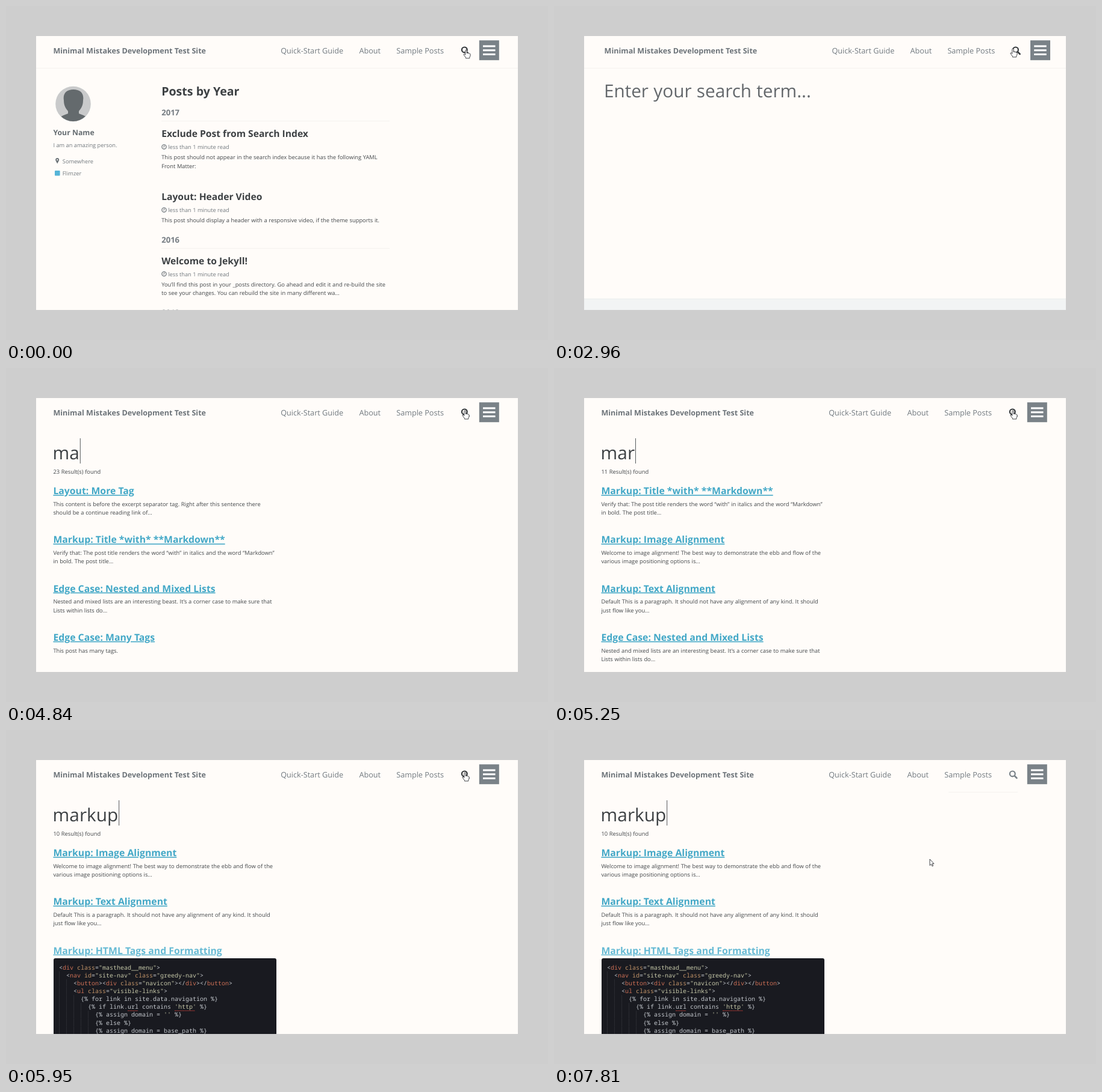
An HTML page that plays this animation: 900x556 px, repeating every 8000 ms.

```html
<!DOCTYPE html>
<html lang="en">
<head>
<meta charset="utf-8">
<title>Site search</title>
<style>
  html, body { margin: 0; width: 100%; height: 100%; overflow: hidden; background: #cecece; }
  svg { display: block; width: 900px; height: 556px; }
  text { font-family: "Open Sans", "Noto Sans", sans-serif; text-rendering: geometricPrecision; white-space: pre; }
  .brand, .year, .name, .h1, .h2, .link { font-weight: 700; }
  .brand { font-size: 12.55px; fill: #6d747a; }
  .nav { font-size: 12.65px; fill: #727a80; }
  .h1 { font-size: 19.6px; fill: #3d4144; }
  .h2 { font-size: 15.65px; fill: #3d4144; }
  .year { font-size: 13.1px; fill: #757c82; }
  .name { font-size: 12.3px; fill: #666d72; }
  .meta { font-size: 9.28px; fill: #737a7f; }
  .body { font-size: 9.32px; fill: #44484b; word-spacing: .03em; }
  .link { font-size: 15.8px; fill: #43a8c7; text-decoration: underline; text-decoration-skip-ink: none; }
  .pale { fill: #66bad4; }
  .query { font-size: 29.8px; fill: #3d4144; }
  .hint { font-size: 29.7px; fill: #64686c; word-spacing: .02em; }
  .code { font-family: "Noto Sans Mono", "DejaVu Sans Mono", monospace; font-size: 10px; fill: #c3c7cc; }
  .tag { fill: #cc6f55; }
  .attr { fill: #c39468; }
  .str { fill: #c6c8a8; }
  .rule { stroke: #f4f2ef; }
  .pointer { fill: #fff; stroke: #3a3c40; stroke-width: .95; stroke-linejoin: round; }
</style>
</head>
<body>
<svg id="stage" viewBox="0 0 900 556"></svg>
<script>
const LOOP = 8000;
const LEFT = 78.4, MAIN = 258.2;

const esc = s => s.replace(/&/g, "&amp;").replace(/</g, "&lt;");
const text = (cls, x, y, s) => `<text class="${cls}" x="${x}" y="${y}">${esc(s)}</text>`;
const group = (id, body) => `<g id="${id}">${body}</g>`;
const rule = (x1, x2, y) => `<path class="rule" d="M${x1} ${y}.5H${x2}"/>`;

// Page header
const bars = [65.4, 72.2, 79].map(y => `<rect x="792" y="${y}" width="20.5" height="3" fill="#fff"/>`).join("");
const header = group("header",
  text("brand", LEFT, 79, "Minimal Mistakes Development Test Site") +
  text("nav", 456.2, 79, "Quick-Start Guide") +
  text("nav", 586.4, 79, "About") +
  text("nav", 648.2, 79, "Sample Posts") +
  `<g id="lens" fill="none" stroke-width="2.2"><circle cx="761.3" cy="72.9" r="4.4"/>
   <path d="M764.8 76.4L768.4 80" stroke-width="2.6" stroke-linecap="round"/></g>
   <rect id="ring" x="752.5" y="64.5" width="20.5" height="19" rx="1" fill="none" stroke="#c2a56c"/>
   <rect x="785.8" y="57.2" width="33" height="33" fill="#7a8288"/>${bars}`);

// Post archive
const sidebar = `
  <clipPath id="round"><circle cx="111.5" cy="163" r="29"/></clipPath>
  <circle cx="111.5" cy="163" r="29.3" fill="#c9cacb"/>
  <g clip-path="url(#round)" fill="#646a6d">
    <path d="M96 157C94 145 101 139 112 139S130 145 128 157C128 167 124 171 121 175V179C128 182 136 183 139 193H85C88 183 96 182 103 179V175C100 171 96 167 96 157Z"/>
  </g>` +
  text("name", LEFT, 215, "Your Name") +
  text("meta", LEFT, 235, "I am an amazing person.") +
  `<path d="M85.2 262.5C83.5 259 82.2 257.7 82.2 256.1A3 3 0 0 1 88.2 256.1C88.2 257.7 86.9 259 85.2 262.5Z" fill="#6c7378"/>
   <circle cx="85.2" cy="256.2" r="1.1" fill="#fffcf9"/>` +
  text("meta", 93.8, 261.5, "Somewhere") +
  `<rect x="81" y="274" width="8.6" height="8.6" rx="1" fill="#55b4d8"/>` +
  text("meta", 93.8, 282, "Flimzer");

const readTime = y =>
  `<g fill="none" stroke="#747b80"><circle cx="262.5" cy="${y - 3.6}" r="3.6" stroke-width="1.3"/>
   <path d="M262.8 ${y - 6}V${y - 3.2}H261"/></g>` + text("meta", 269.2, y, "less than 1 minute read");

const post = (y, title, lines) => text("h2", MAIN, y, title) + readTime(y + 20) +
  lines.map((s, i) => text("body", MAIN, y + 37 + i * 14.5, s)).join("");

const archive = group("archive", sidebar +
  text("h1", MAIN, 149, "Posts by Year") +
  text("year", MAIN, 182, "2017") + rule(258, 637, 191) +
  post(218, "Exclude Post from Search Index", [
    "This post should not appear in the search index because it has the following YAML",
    "Front Matter:"]) +
  post(323, "Layout: Header Video", [
    "This post should display a header with a responsive video, if the theme supports it."]) +
  text("year", MAIN, 394, "2016") + rule(258, 637, 403) +
  post(429.5, "Welcome to Jekyll!", [
    "You’ll find this post in your _posts directory. Go ahead and edit it and re-build the site",
    "to see your changes. You can rebuild the site in many different wa..."]) +
  text("year", MAIN, 514.5, "2013"));

// Search results
const ITEMS = {
  more: ["Layout: More Tag",
    "This content is before the excerpt separator tag. Right after this sentence there",
    "should be a continue reading link of..."],
  title: ["Markup: Title *with* **Markdown**",
    "Verify that: The post title renders the word “with” in italics and the word “Markdown”",
    "in bold. The post title..."],
  nested: ["Edge Case: Nested and Mixed Lists",
    "Nested and mixed lists are an interesting beast. It’s a corner case to make sure that",
    "Lists within lists do..."],
  many: ["Edge Case: Many Tags", "This post has many tags."],
  image: ["Markup: Image Alignment",
    "Welcome to image alignment! The best way to demonstrate the ebb and flow of the",
    "various image positioning options is..."],
  align: ["Markup: Text Alignment",
    "Default This is a paragraph. It should not have any alignment of any kind. It should",
    "just flow like you..."],
  html: ["Markup: HTML Tags and Formatting"]
};

const CODE = [
  [0, `<div class="masthead__menu">`],
  [1, `<nav id="site-nav" class="greedy-nav">`],
  [2, `<button><div class="navicon"></div></button>`],
  [2, `<ul class="visible-links">`],
  [3, `{% for link in site.data.navigation %}`],
  [4, `{% if link.url contains 'http' %}`],
  [5, `{% assign domain = '' %}`],
  [5, `{% else %}`],
  [5, `{% assign domain = base_path %}`]
];

const paint = s => s.split(/("[^"]*"|'[^']*'|[a-z]+(?==")|(?<=<\/?)[a-z]+)/).map((part, i) => {
  if (i % 2 === 0) return esc(part);
  const cls = /^["']/.test(part) ? "str" : part === "class" || part === "id" ? "attr" : "tag";
  return `<tspan class="${cls}">${part}</tspan>`;
}).join("");

const codeBlock = () => {
  const lines = CODE.map(([depth, s], i) => {
    const y = 398.5 + i * 13.15;
    let guides = "";
    for (let d = 0; d < depth; d++) guides += `M${88.5 + d * 12} ${y - 10}v13`;
    return `<path d="${guides}" stroke="#2a2b31"/>` +
      `<text class="code" x="${88 + depth * 12}" y="${y}">${paint(s)}</text>`;
  }).join("");
  return `<rect x="79" y="380" width="370" height="150" rx="3" fill="#191a20"/>${lines}
    <path d="M202 467.3h17M280 467.3h34" stroke="#b23a35" stroke-dasharray="2 .6"/>`;
};

const results = ([, count, keys]) => text("body", LEFT, 176, count + " Result(s) found") +
  keys.map((key, i) => {
    const y = 210 + i * 81.3;
    const [title, ...lines] = ITEMS[key];
    return text(key === "html" ? "link pale" : "link", LEFT, y, title) +
      lines.map((s, n) => text("body", LEFT, y + 19.7 + n * 14.4, s)).join("") +
      (key === "html" ? codeBlock() : "");
  }).join("");

// Timeline tables: [start, value, ...]
const TYPED = [[0, ""], [4440, "m"], [4840, "ma"], [5080, "mar"], [5290, "mark"], [5650, "marku"], [5830, "markup"]];
const FOUND = [
  [4560, 23, ["more", "title", "nested", "many"]],
  [4960, 14, ["title", "many", "image", "align"]],
  [5180, 11, ["title", "image", "align", "nested"]],
  [5740, 10, ["image", "align", "html"]]
];
const CARET = [[0, 0], [2460, 1], [2960, 0], [3520, 1], [4010, 0], [4440, 1], [6280, 0], [6780, 1], [7300, 0], [7810, 1]];
const OPEN = 2050, WIDE = 4560;

const stage = document.getElementById("stage");
stage.innerHTML = `
  <clipPath id="window"><rect x="50" y="50" width="800" height="456"/></clipPath>
  <rect width="900" height="556" fill="#cecece"/>
  <g clip-path="url(#window)">
    <rect x="50" y="50" width="800" height="456" fill="#fffcf9"/>
    ${group("line", rule(50, 850, 103))}
    ${group("trace", rule(655, 770, 103))}
    ${group("footer", '<rect x="50" y="487" width="800" height="19" fill="#f2f4f4"/><path d="M50 487.5H850" stroke="#eceeee"/>')}
    ${header}${archive}
    ${group("search",
      text("hint", 77.8, 152, "Enter your search term...") +
      text("query", 77.6, 152, "") +
      '<rect id="caret" y="117" width="1" height="42" fill="#55595c"/>' +
      FOUND.map(f => `<g class="found">${results(f)}</g>`).join(""))}
  </g>
  <path id="hand" class="pointer" d="M-1.2 1.2A1.2 1.2 0 0 1 1.2 1.2V5.4L2.4 5.1 3.5 5.7 4.6 5.4 5.5 6.2 6.5 6.3 7 7.2V10L5.8 12.2V14H-.6V12.7L-4 8.2 -3.7 7 -2.5 7 -1.2 8.4Z"/>
  <path id="arrow" class="pointer" d="M0 0V10.5L2.4 8.3 4 11.8 5.6 11.1 4.1 7.6H7Z"/>`;

const $ = id => document.getElementById(id);
const show = (el, on) => { el.style.display = on ? "" : "none"; };
const at = (table, t) => table.filter(row => row[0] <= t).pop();
const ramp = (t, a, b) => Math.min(1, Math.max(0, (t - a) / (b - a)));
const ease = p => p * p * (3 - 2 * p);
const hint = stage.querySelector(".hint");
const query = stage.querySelector(".query");
const found = [...stage.querySelectorAll(".found")];

function render(t) {
  const opened = t >= OPEN;
  const narrow = opened && t < WIDE;
  const shift = `translate(${narrow ? 5.2 : 0})`;
  const typed = at(TYPED, t)[1];

  $("header").setAttribute("transform", shift);
  $("search").setAttribute("transform", shift);
  show($("archive"), !opened);
  show($("search"), opened);
  show($("footer"), narrow);
  show($("line"), t < WIDE);
  show($("trace"), t >= 7050);
  show($("ring"), t >= 1900 && t < 2440);

  show(hint, !typed);
  hint.style.opacity = ease(ramp(t, 2230, 2460));
  if (query.textContent !== typed) query.textContent = typed;
  const width = typed && opened ? query.getComputedTextLength() : 0;
  $("caret").setAttribute("x", 78.5 + width);
  show($("caret"), at(CARET, t)[1]);
  const current = FOUND.indexOf(at(FOUND, t));
  found.forEach((el, i) => show(el, i === current));

  const settle = ramp(t, 60, 160), leave = ease(ramp(t, 6960, 7500));
  const x = 764 - 2 * settle - 138 * leave;
  const y = 73 - 2 * settle + 144 * leave;
  const hover = leave < .08;
  show($("hand"), hover);
  show($("arrow"), !hover);
  for (const id of ["hand", "arrow"]) $(id).setAttribute("transform", `translate(${x} ${y})`);
  $("lens").setAttribute("stroke", hover ? "#34383b" : "#7a8288");
}

const begin = performance.now();
function tick() {
  render((performance.now() - begin) % LOOP);
  requestAnimationFrame(tick);
}
tick();
</script>
</body>
</html>
```
